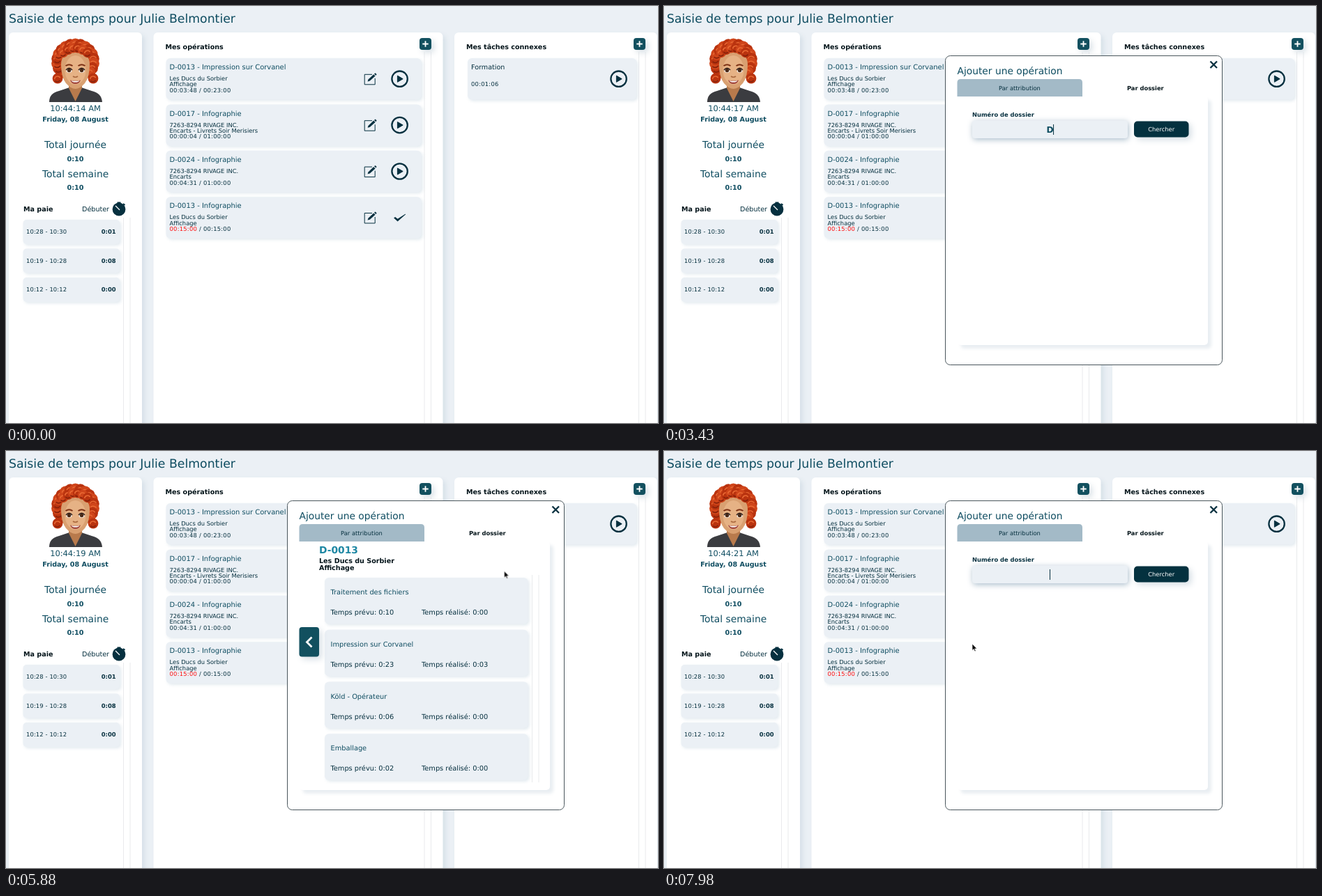
Recreate the animation shown at these times as an HTML page. Size 935 by 599 pixels, loop 8000 ms.

```html
<!DOCTYPE html>
<html lang="fr">
<head>
<meta charset="utf-8">
<title>Saisie de temps</title>
<style>
html, body { margin: 0; width: 100%; height: 100%; overflow: hidden; background: #ebf0f5; }
svg { display: block; width: 935px; height: 599px; font-family: "DejaVu Sans", sans-serif; }
text { fill: #06303f; font-size: 8.35px; white-space: pre; text-rendering: geometricPrecision; }
.teal { fill: #0f4d61; }
.black { fill: #04141a; }
.red { fill: #ff0a0a; }
.white { fill: #fff; }
.b { font-weight: bold; }
.mid { text-anchor: middle; }
.end { text-anchor: end; }
.num { letter-spacing: .26px; }
.range { letter-spacing: .13px; }
.s96 { font-size: 9.6px; }
.s98 { font-size: 9.8px; }
.s10 { font-size: 9.95px; }
.s11 { font-size: 11.45px; }
.s12 { font-size: 12.2px; }
.s14 { font-size: 13.8px; }
.s17 { font-size: 17.3px; }
.bright { fill: #1d87a3; }

.panel { fill: #fff; filter: drop-shadow(4px 4px 3px #d6e0e8); }
.card { fill: #ebf0f5; filter: drop-shadow(2px 2px 2px #d4dfe7aa); }
.sheet { fill: #fff; filter: drop-shadow(5px 5px 2px #e9eef2); }
.field { fill: #ebf0f5; filter: drop-shadow(1px 2px 4px #a9bccb); }
.soft { filter: drop-shadow(4px 4px 4px #d8e0e6); }
.track { stroke: #e9eaec; fill: none; }
.ink { fill: #06303f; }
.line { fill: none; stroke: #06303f; }

.plus, .back { fill: #12505f; }
.submit { fill: #04313f; }
.live { animation: 8s linear infinite; }
.plus.live { animation-name: plusHover; animation-timing-function: step-end; }
.submit.live { animation-name: submitHover; }
.back.live { animation-name: backHover; }
#modal { animation: modal 8s step-end infinite; }
#search { animation: search 8s step-end infinite; }
#list { animation: list 8s step-end infinite; }
.job0 { animation: job0 8s linear infinite; }
.job1 { animation: job1 8s linear infinite; }
.job0 .card { animation: tint0 8s linear infinite; }
.job1 .card { animation: tint1 8s linear infinite; }
#cursor { animation: move 8s ease-in-out infinite; }

@keyframes plusHover { 0% { fill: #12505f } 12.2% { fill: #3f7f93 } 17.5%, 100% { fill: #12505f } }
@keyframes submitHover { 0%, 64.8% { fill: #04313f } 66.5%, 73.5% { fill: #165567 } 73.6%, 100% { fill: #04313f } }
@keyframes backHover { 0%, 91.2% { fill: #12505f } 93%, 100% { fill: #3f7f93 } }
@keyframes modal { 0% { opacity: 0 } 17.5%, 100% { opacity: 1 } }
@keyframes search { 0% { opacity: 1 } 73.5% { opacity: 0 } 98%, 100% { opacity: 1 } }
@keyframes list { 0% { opacity: 0 } 73.5% { opacity: 1 } 98%, 100% { opacity: 0 } }
@keyframes job0 { 0%, 79.8% { opacity: 1 } 81%, 82% { opacity: .8 } 83.5%, 100% { opacity: 1 } }
@keyframes job1 { 0%, 82.3% { opacity: 1 } 84.3%, 91% { opacity: .8 } 93%, 100% { opacity: 1 } }
@keyframes tint0 { 0%, 79.8% { fill: #ebf0f5 } 81%, 82% { fill: #dae3ea } 83.5%, 100% { fill: #ebf0f5 } }
@keyframes tint1 { 0%, 82.3% { fill: #ebf0f5 } 84.3%, 91% { fill: #dae3ea } 93%, 100% { fill: #ebf0f5 } }
@keyframes move {
  0%, .875% { transform: translate(545px, 463px) }
  1.75%, 4.375% { transform: translate(554px, 396px) }
  9.625%, 11.375% { transform: translate(590px, 60px) }
  13.125%, 20.125% { transform: translate(598.5px, 58.5px) }
  24.5%, 28.875% { transform: translate(664.5px, 125.5px) }
  36%, 62.125% { transform: translate(555px, 177px) }
  63.875% { transform: translate(640px, 214px) }
  66.5%, 67.375% { transform: translate(715px, 177px) }
  69.125%, 77.875% { transform: translate(714.5px, 172.5px) }
  84.5%, 88.5% { transform: translate(483.5px, 265px) }
  93.5%, 100% { transform: translate(442px, 277px) }
}
</style>
</head>
<body>
<svg id="stage" viewBox="0 0 935 599">
  <defs>
    <g id="play">
      <circle r="11.2" class="line" stroke-width="2.3"/>
      <path d="M-3.2-4.6V4.6L4.6 0Z" class="ink" stroke="#06303f" stroke-linejoin="round"/>
    </g>
    <g id="edit">
      <path d="M3-6.5H-7.8V8H7.2V-1" class="line"/>
      <path d="M-3.4 3.6L-2.5.8 5.2-6.6 7.6-4.2-.2 2.8Z" class="ink"/>
      <path d="M6-7.3L7.6-8.6 9.6-6.6 8.3-5Z" class="ink"/>
    </g>
    <path id="check" d="M-8.5.5L-6.5-1-3 1.8 8-5.2 8.6-4.6-3 5.5Z" class="ink"/>
    <path id="cross" d="M-4.2 0H4.2M0-4.2V4.2" stroke="#fff" stroke-width="1.8"/>
  </defs>
</svg>
<script>
const stage = document.getElementById('stage');
const label = (x, y, s, cls = '') => `<text x="${x}" y="${y}" class="${cls}">${s}</text>`;
const rect = (x, y, w, h, r, cls) => `<rect x="${x}" y="${y}" width="${w}" height="${h}" rx="${r}" class="${cls}"/>`;
const icon = (id, x, y) => `<use href="#${id}" x="${x}" y="${y}"/>`;
const track = (x, y, h) => `<path class="track" d="M${x} ${y}v${h}m9.5 0v-${h}"/>`;
const plus = (x, cls) => `<g class="soft">${rect(x, 46, 17, 17, 4, 'plus ' + cls)}${icon('cross', x + 8.5, 54.5)}</g>`;

const client = 'Les Ducs du Sorbier';
const company = '7263-8294 RIVAGE INC.';
const printing = 'Impression sur Corvanel';

function avatar() {
  const curl = (x, y, r, i) => `<circle cx="${x}" cy="${y}" r="${r}" fill="${i % 2 ? '#b9330f' : '#cf451a'}"/>
    <path d="M${x - r * .6} ${y + 1}a${r * .6} ${r * .6} 0 0 1 ${r * 1.1}-2" fill="none" stroke="#ea6a34" stroke-width="1.5"/>
    <path d="M${x - r * .5} ${y + r * .5}q${r * .5} ${r * .4} ${r}-1" fill="none" stroke="#86210a" stroke-width="1.6"/>`;
  let hair = '<ellipse cx="99.5" cy="81" rx="28" ry="27" fill="#8e260c"/>', fringe = '';
  for (let i = 0; i < 17; i++) {
    const a = Math.PI * (-1.22 + 1.44 * i / 16);
    hair += curl(99.5 + 26 * Math.cos(a), 79.5 + 24.5 * Math.sin(a), 8.6, i);
  }
  hair += curl(74, 104, 7.4, 1) + curl(125, 104, 7.4, 1);
  for (let i = 0; i < 6; i++) fringe += curl(82 + 7 * i, 67 - 7 * Math.sin(Math.PI * i / 5), 7.2, i);
  const eye = x => `<ellipse cx="${x}" cy="92.5" rx="4" ry="3.2" fill="#fff"/>
    <circle cx="${x}" cy="92.5" r="2.8" fill="#4a2a18"/>
    <path d="M${x - 4.5} 92q4.5-5.5 9 0" fill="none" stroke="#2b1a14" stroke-width="1.5"/>
    <path d="M${x - 5} 86q5-3.5 10 0" fill="none" stroke="#7d3215" stroke-width="1.9"/>`;
  return `${hair}
    <path d="M62 138Q62 125 76 122L91 117H108L123 122Q137 125 138 138Z" fill="#3b3c40"/>
    <path d="M90 108V118L99.5 137 109 118V108Z" fill="#b87a4c"/>
    <path d="M79 84Q79 66 99.5 66T120 84Q120 102 113 111 106 119 99.5 119T86 111Q79 102 79 84Z" fill="#d9a071"/>
    <ellipse cx="99.5" cy="92" rx="15" ry="21" fill="#e6b285"/>
    ${fringe}${eye(90.5)}${eye(108.5)}
    <path d="M96 101q3.5 2.5 7 0" fill="none" stroke="#a9693f" stroke-width="1.7"/>
    <path d="M92 106.5q7.5 2 15 0-2 5.5-7.5 5.5t-7.5-5.5Z" fill="#a1463c"/>
    <path d="M93.5 107.2q6 1.3 12 0-1.5 2.3-6 2.3t-6-2.3Z" fill="#fff"/>`;
}

function sidebar() {
  const pay = [['10:28 - 10:30', '0:01'], ['10:19 - 10:28', '0:08'], ['10:12 - 10:12', '0:00']];
  return rect(4, 38, 191, 580, 6, 'panel') + avatar()
    + '<text id="clock" x="99.5" y="151" class="teal mid s11"></text>'
    + label(99.5, 166, 'Friday, 08 August', 'teal b mid s96')
    + label(99.5, 204, 'Total journée', 'teal mid s14') + label(99.5, 222.7, '0:10', 'teal b mid s96')
    + label(99.5, 245.5, 'Total semaine', 'teal mid s14') + label(99.5, 264.2, '0:10', 'teal b mid s96')
    + label(25, 294.7, 'Ma paie', 'black b s96') + label(109, 294.7, 'Débuter', 's96')
    + `<circle cx="162" cy="292" r="9.4" class="ink"/>
       <path d="M159.5 282.5h5M162 282v3M168 284l2.5 2" class="line" stroke-width="2"/>
       <path d="M157 287l6 6" stroke="#fff" stroke-width="1.3"/>`
    + pay.map(([span, total], i) => {
      const y = 41.5 * i;
      return rect(24.5, 307 + y, 138.5, 35, 5, 'card') + label(29, 327.2 + y, span, 'range')
        + label(157.5, 327.2 + y, total, 'b end');
    }).join('') + track(168.5, 304, 295);
}

function operations() {
  const jobs = [
    ['D-0013 - ' + printing, client, 'Affichage', '00:03:48', '00:23:00'],
    ['D-0017 - Infographie', company, 'Encarts - Livrets Soir Merisiers', '00:00:04', '01:00:00'],
    ['D-0024 - Infographie', company, 'Encarts', '00:04:31', '01:00:00'],
    ['D-0013 - Infographie', client, 'Affichage', '00:15:00', '00:15:00']
  ];
  return rect(211.5, 38, 415, 580, 6, 'panel') + label(228.5, 62, 'Mes opérations', 'black b s96')
    + track(600, 66, 533) + plus(593, 'live')
    + jobs.map(([title, who, kind, spent, planned], i) => {
      const y = 66.4 * i, done = spent === planned;
      return rect(229.5, 75 + y, 366, 59.5, 6, 'card')
        + label(234.5, 91.2 + y, title, 'teal s10') + label(234.5, 107.1 + y, who) + label(234.5, 115.4 + y, kind)
        + label(234.5, 123.7 + y, `<tspan class="${done ? 'red' : ''}">${spent}</tspan> / ${planned}`, 'num')
        + icon('edit', 522, 104.8 + y) + icon(done ? 'check' : 'play', 564.6, 104.7 + y);
    }).join('');
}

function tasks() {
  return rect(643, 38, 291, 580, 6, 'panel') + label(660, 62, 'Mes tâches connexes', 'black b s96')
    + track(907.5, 66, 533) + plus(900, '') + rect(662, 75, 242, 59.5, 6, 'card')
    + label(667, 91.2, 'Formation', 's96') + label(667, 115.3, '00:01:06', 'num') + icon('play', 878.6, 104.7);
}

function modal() {
  const steps = [['Traitement des fichiers', '0:10', '0:00'], [printing, '0:23', '0:03'],
    ['Köld - Opérateur', '0:06', '0:00'], ['Emballage', '0:02', '0:00']];
  const search = label(442, 159, 'Numéro de dossier', 'b')
    + rect(442, 164.5, 223, 25.5, 4, 'field')
    + '<text id="value" x="553.5" y="181.7" class="teal b mid s12"></text>'
    + '<rect id="caret" y="170" width="1" height="15" class="ink"/>'
    + `<g class="soft">${rect(674, 165.5, 78.5, 23, 5, 'submit live')}</g>` + label(713.2, 180, 'Chercher', 'white mid');
  const list = label(449, 147, 'D-0013', 'bright b s14') + label(449, 161, client, 'black b s96')
    + label(449, 171, 'Affichage', 'black b s96') + track(754.5, 178, 298)
    + steps.map(([name, planned, spent], i) => {
      const y = 74.75 * i;
      return `<g class="job${i}">` + rect(457, 182 + y, 291.5, 66.5, 6, 'card')
        + label(465.5, 206 + y, name, 'teal s98') + label(465.5, 235.1 + y, 'Temps prévu: ' + planned, 's98')
        + label(596, 235.1 + y, 'Temps réalisé: ' + spent, 's98') + '</g>';
    }).join('')
    + `<g class="soft">${rect(420.5, 253, 28.5, 42.5, 4, 'back live')}</g>
       <path d="M438.5 267.5l-7 7 7 7" fill="none" stroke="#fff" stroke-width="2.8"/>`;
  return `<g id="modal"><rect x="403.5" y="71.5" width="397" height="444" rx="7" fill="#fff" stroke="#4a565c"/>
    <path d="M783.5 79.5l9.5 9.5m0-9.5l-9.5 9.5" class="line" stroke-width="2.3"/>
    ${label(420.5, 98, 'Ajouter une opération', 'teal s14')}
    ${rect(420.5, 130, 359.5, 357, 5, 'sheet')}
    <path d="M420.5 130V110q0-5 5-5H595q5 0 5 5V130Z" fill="#a3bac7"/>
    ${label(510, 120.5, 'Par attribution', 'mid')}${label(690.3, 120.5, 'Par dossier', 'black b mid')}
    <g id="search">${search}</g><g id="list">${list}</g></g>`;
}

const pointer = `<g id="cursor">
  <path id="arrow" d="M0 0V9.5L2.2 7.5 3.7 11 5.2 10.3 3.7 7H6.7Z" stroke="#fff" stroke-width=".7"/>
  <path id="hand" d="M-1.2.8a1.2 1.2 0 0 1 2.4 0V4.2l4 .9q1.6.5 1.5 2l-.7 4h-6L-3.8 7q-.6-1.6 1-1.4l1.6 1.2Z" fill="#fff" stroke="#000"/>
  <path id="beam" d="M-2-6q2 0 2 1.5 0-1.5 2-1.5M0-5V5M-2 6q2 0 2-1.5 0 1.5 2 1.5" fill="none" stroke="#222"/>
</g>`;

stage.insertAdjacentHTML('beforeend',
  label(4, 24, 'Saisie de temps pour Julie Belmontier', 'teal s17')
  + sidebar() + operations() + tasks() + modal() + pointer);

// Each list holds [start ms, value] pairs.
const seconds = [[0, 14], [1050, 15], [2100, 16], [3080, 17], [4130, 18], [5110, 19], [6860, 20], [7840, 21]];
const typed = [[0, 0], [3430, 1], [3780, 2], [4060, 3], [4200, 4], [4480, 5], [4550, 6], [5880, 0]];
const blink = [[0, 0], [2170, 1], [2660, 0], [2870, 1], [3290, 0], [3430, 1], [5110, 0], [7840, 1]];
const shapes = [[0, ''], [70, 'arrow'], [980, 'hand'], [1400, 'arrow'], [1890, 'hand'], [2520, 'arrow'],
  [2660, 'beam'], [3430, ''], [4970, 'beam'], [5040, 'arrow'], [6440, 'hand'], [7770, 'arrow']];
const at = (list, t) => list.findLast(([start]) => start <= t)[1];
const get = id => document.getElementById(id);
const clock = get('clock'), value = get('value'), caret = get('caret');
const looks = ['arrow', 'hand', 'beam'].map(get);

function render() {
  const t = performance.now() % 8000;
  const shape = at(shapes, t);
  clock.textContent = `10:44:${at(seconds, t)} AM`;
  value.textContent = 'D-0013'.slice(0, at(typed, t));
  caret.setAttribute('x', 553 + value.getComputedTextLength() / 2);
  caret.setAttribute('opacity', at(blink, t));
  looks.forEach(el => el.setAttribute('opacity', el.id === shape ? 1 : 0));
  requestAnimationFrame(render);
}
render();
</script>
</body>
</html>
```
